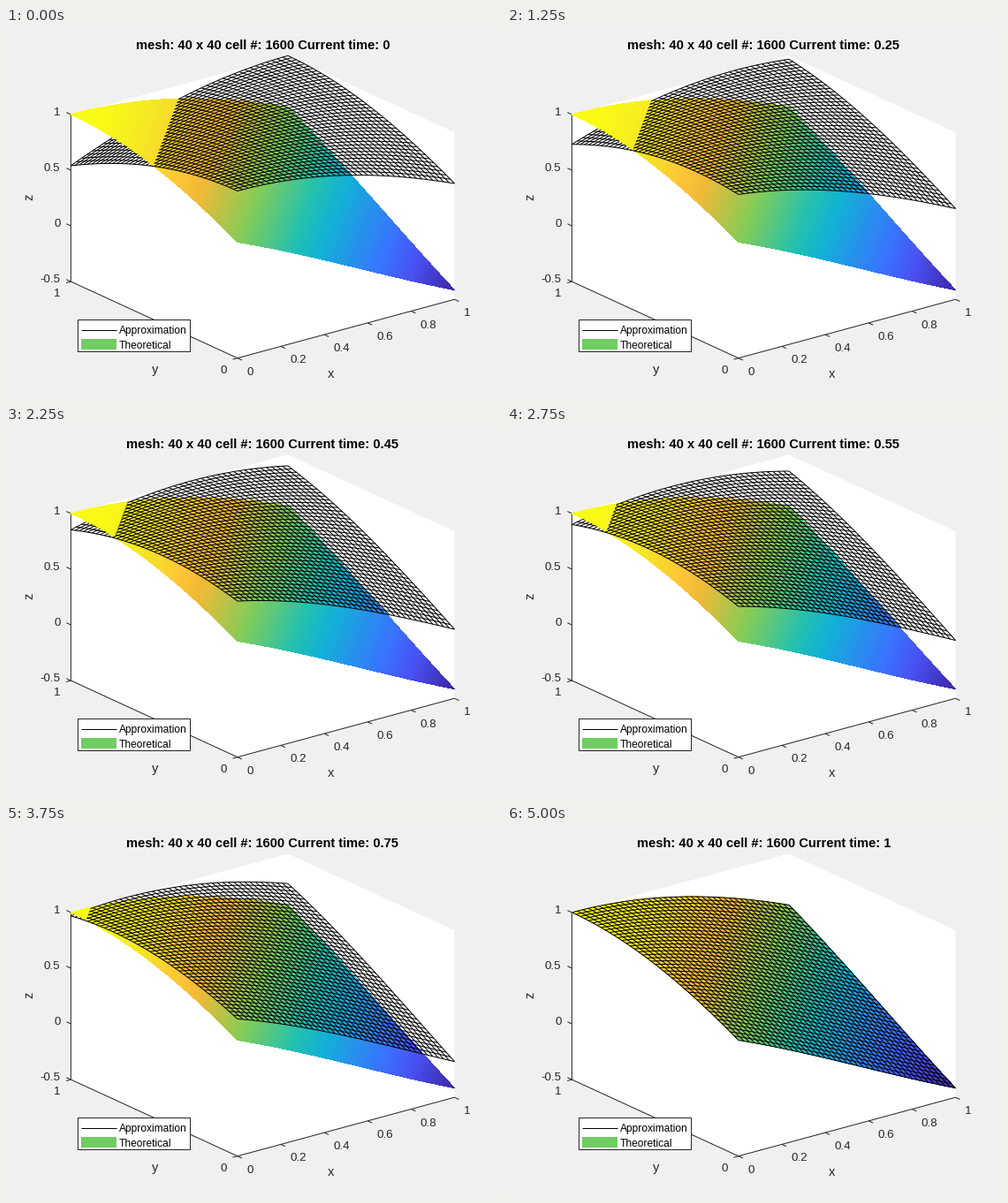
A matplotlib script that plays this animation: 560 px wide and 420 px high, repeating every 5050 ms.

```python
import numpy as np
import matplotlib.pyplot as plt
from matplotlib.animation import FuncAnimation
from matplotlib.collections import LineCollection, PolyCollection
from matplotlib.colors import LinearSegmentedColormap
from matplotlib.patches import Rectangle

W, H, DPI = 560, 420, 100
PX = 72 / DPI            # points per pixel
INK = (0.15, 0.15, 0.15)
CELLS, SAMPLES = 40, 201
FRAMES, STEP = 101, 0.01
BIAS = 0.009             # lines win over the surface when this close

# Axes rectangle in pixels and the angles the cube is seen from.
LEFT, BOTTOM, WIDE, TALL = 73.4, 373.7, 434, 342.3
AZ, EL = np.radians(37.5), np.radians(30)
ZMIN, ZSPAN = -0.5, 1.5

CA, SA, CE, SE = np.cos(AZ), np.sin(AZ), np.cos(EL), np.sin(EL)
KX = WIDE / (CA + SA)
KY = TALL / ((CA + SA) * SE + CE)
VIEW = (-SA * CE, -CA * CE, SE * ZSPAN)   # towards the viewer, in data units

PARULA = LinearSegmentedColormap.from_list("parula", [
    (0, "#3e26a8"), (0.14, "#4852f4"), (0.24, "#3875fe"), (0.43, "#12b1d6"),
    (0.52, "#24c1ae"), (0.667, "#81cc59"), (0.81, "#f0ba36"),
    (0.857, "#fec338"), (0.937, "#f5e327"), (1, "#f9fb15")])

plt.rcParams["font.family"] = "Liberation Sans"
fig = plt.figure(figsize=(W / DPI, H / DPI), dpi=DPI, facecolor="#f0f0f0")
ax = fig.add_axes([0, 0, 1, 1])
ax.set_xlim(0, W)
ax.set_ylim(H, 0)
ax.axis("off")


def project(x, y, z):
    sx = LEFT + KX * (CA * x + SA * (1 - y))
    sy = BOTTOM - KY * (SE * (SA * x + CA * y) + CE * (z - ZMIN) / ZSPAN)
    return np.stack(np.broadcast_arrays(sx, sy), axis=-1)


def wave(d, t):
    return np.cos(d + t)


def line(points, color=INK, z=2):
    ax.plot(*np.transpose(points), color=color, lw=PX, zorder=z,
            solid_capstyle="butt")


def label(x, y, text, size=13.33, color=INK, ha="center", z=3, **kw):
    return ax.text(x, y, text, fontsize=size * PX, color=color, ha=ha,
                   va="baseline", zorder=z, **kw)


def draw_ticks(values, place, tick, offset, ha):
    for v in values:
        p = place(v)
        line([p, p + tick])
        label(*(p + offset), f"{v:g}", ha=ha)


def draw_box():
    hexagon = [project(*p) for p in ((0, 0, -0.5), (1, 0, -0.5), (1, 0, 1),
                                     (1, 1, 1), (0, 1, 1), (0, 1, -0.5))]
    ax.add_patch(plt.Polygon(hexagon, fc="white", ec="none", zorder=0))
    line([project(0, 1, 1), project(0, 1, -0.5),
          project(0, 0, -0.5), project(1, 0, -0.5)])

    draw_ticks(np.arange(6) / 5, lambda v: project(v, 0, -0.5),
               (5, 2.3), (10.2, 19), "left")
    draw_ticks((0, 0.5, 1), lambda v: project(0, v, -0.5),
               (-5.3, 1.45), (-12, 17), "right")
    draw_ticks((-0.5, 0, 0.5, 1), lambda v: project(0, 1, v),
               (-5, -2.3), (-12, 1), "right")

    label(367.5, 395.5, "x", 14.67)
    label(168.5, 390.5, "y", 14.67)
    label(30.5, 191.5, "z", 14.67, rotation=90, rotation_mode="anchor")


def draw_theory():
    # The surface depends on x - y only, so straight strips cover it.
    d = np.linspace(-1, 1, 257)
    z = wave(d, 1)
    near = project(np.maximum(d, 0), np.maximum(-d, 0), z)
    far = project(np.minimum(1, 1 + d), np.minimum(1, 1 - d), z)
    quads = np.stack([near[:-1], near[1:], far[1:], far[:-1]], axis=1)
    level = (wave((d[:-1] + d[1:]) / 2, 1) - np.cos(2)) / (1 - np.cos(2))
    ax.add_collection(PolyCollection(quads, facecolors=PARULA(level),
                                     edgecolors="none", antialiaseds=False,
                                     zorder=4), autolim=False)


def draw_legend():
    ax.add_patch(Rectangle((81.5, 330.5), 127, 36, fc="white", ec=INK,
                           lw=PX, snap=False, zorder=7))
    line([(85, 341.5), (125, 341.5)], "black", 8)
    ax.add_patch(Rectangle((85, 352), 40, 12, fc="#6fcd61", ec="none", zorder=8))
    label(127.7, 345.6, "Approximation", 12, "black", "left", 8)
    label(127.7, 363, "Theoretical", 12, "black", "left", 8)


draw_box()
draw_theory()
draw_legend()

fixed, along = np.meshgrid(np.linspace(0, 1, CELLS + 1),
                           np.linspace(0, 1, SAMPLES), indexing="ij")
gx = np.vstack([fixed, along])
gy = np.vstack([along, fixed])
reach = np.minimum(gx / -VIEW[0], gy / -VIEW[1])   # sight line inside the domain
exit_d = gx - gy + (VIEW[0] - VIEW[1]) * reach

mesh = LineCollection([], colors="black", linewidths=PX, zorder=5)
ax.add_collection(mesh, autolim=False)
title = label(290.3, 24, "", 14.67, "black", weight="bold")


def update(i):
    t = i * STEP
    z = wave(gx - gy, t)
    above = z >= wave(gx - gy, 1) - BIAS
    missed = z + VIEW[2] * reach <= wave(exit_d, 1)
    points = project(gx, gy, z)
    points[~(above | missed)] = np.nan
    mesh.set_segments(list(points))
    title.set_text(f"mesh: 40 x 40 cell #: 1600 Current time: {round(t, 2):g}")
    return mesh, title


anim = FuncAnimation(fig, update, frames=FRAMES, interval=50, repeat=True,
                     repeat_delay=0, blit=False)
plt.show()
```
